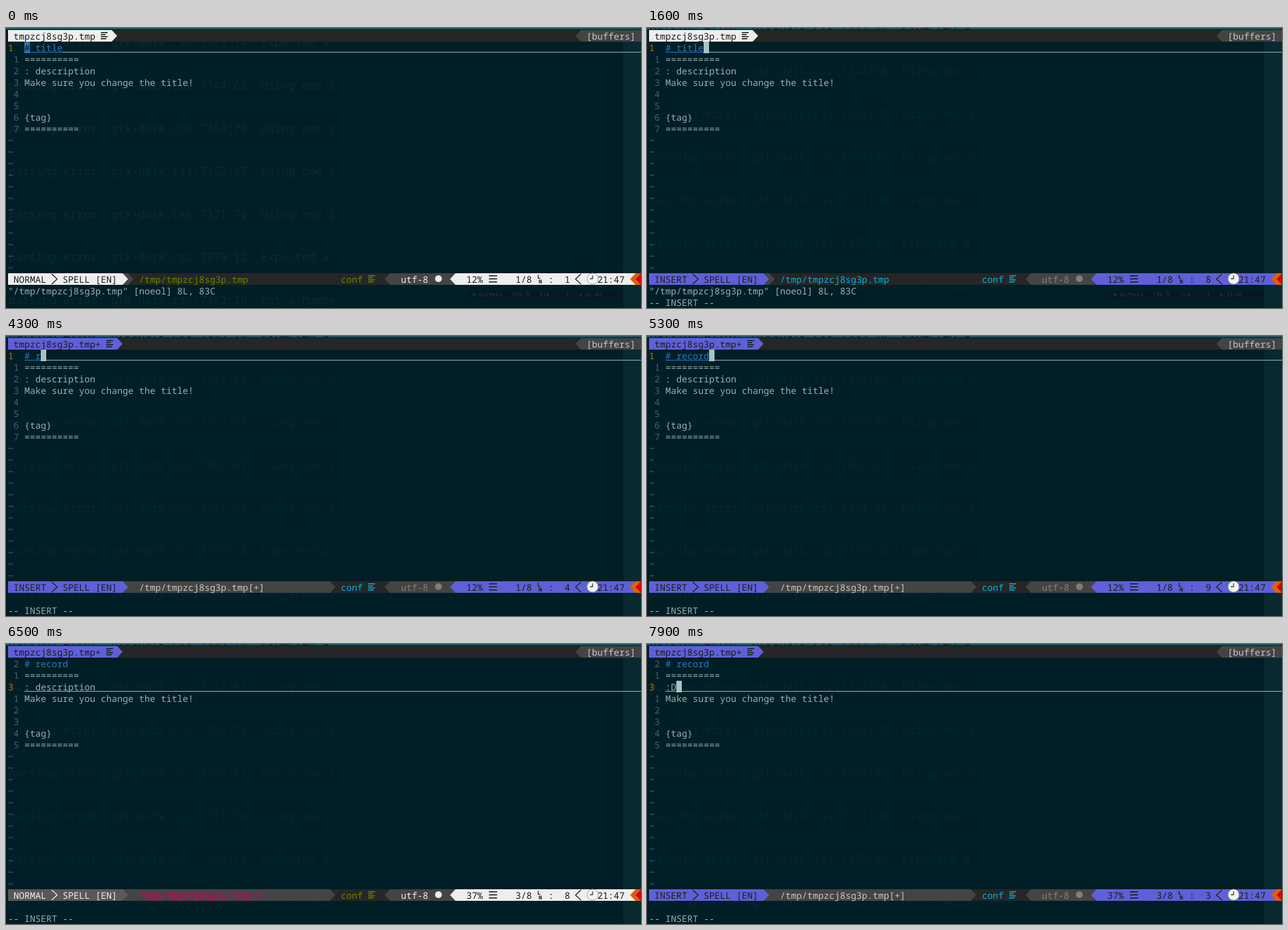
Write an HTML page that moves like this. It is 931 px wide and 411 px high and loops after 8 s.

```html
<!DOCTYPE html>
<html lang="en">
<head>
<meta charset="utf-8">
<title>Terminal editor</title>
<style>
  html, body { margin: 0; width: 100%; height: 100%; overflow: hidden; background: #001e26; }
  svg { display: block; width: 931px; height: 411px; }
  text {
    font: 13.333px "Noto Sans Mono", "DejaVu Sans Mono", monospace;
    white-space: pre;
    text-rendering: geometricPrecision;
  }
  .ghost { font-size: 16.667px; }
  .tiny { font-size: 8px; font-weight: bold; }
</style>
</head>
<body>
<svg id="stage" viewBox="0 0 931 411"></svg>
<script>
(() => {
const LOOP = 8000, CELL = 8, LINE = 17, LEFT = 27;
const C = {
  bg: '#001e26', text: '#93b1b1', blue: '#2379c2', tilde: '#1c74ae', num: '#49616a',
  current: '#a87808', cursor: '#a6c3c3', bar: '#262626', mid: '#444444', grey: '#585858',
  white: '#eeeeee', ink: '#1c1c1c', violet: '#5f5fd7', olive: '#5f8700', cyan: '#00afe0',
  pink: '#d7005f', light: '#c6c6c6', dim: '#808072'
};

// Each step changes only the listed parts of the editor state.
const steps = [
  [0, { row: 1, col: 1, insert: false, title: '# title', desc: ': description',
        dirty: false, msg: true, hint: false, cursor: true, shift: 21 }],
  [200, { shift: 0 }],
  [1000, { row: 2 }],
  [1400, { row: 1 }],
  [1600, { insert: true, hint: true, col: 8 }],
  [2000, { title: '# ', col: 3, dirty: true }],
  [2400, { title: '', col: 1, msg: false }],
  [2500, { title: '#', col: 2 }],
  [2800, { title: '# ', col: 3 }],
  [3600, { title: '# R', col: 4 }],
  [4100, { title: '# ', col: 3 }],
  [4300, { title: '# r', col: 4 }],
  [4500, { title: '# re', col: 5 }],
  [4700, { title: '# rec', col: 6 }],
  [4800, { title: '# reco', col: 7 }],
  [5000, { title: '# recor', col: 8 }],
  [5100, { title: '# record', col: 9 }],
  [5500, { insert: false, hint: false, col: 8 }],
  [5900, { row: 2 }],
  [6300, { row: 3 }],
  [6500, { hint: true, cursor: false }],
  [6600, { insert: true, cursor: true, col: 14 }],
  [6700, { desc: ':', col: 2 }],
  [7900, { desc: ':D', col: 3 }]
];

const rowTop = row => 3 + row * LINE;
const esc = s => s.replace(/&/g, '&amp;').replace(/</g, '&lt;');
const rect = (x, y, w, h, fill) => `<rect x="${x}" y="${y}" width="${w}" height="${h}" fill="${fill}"/>`;
const poly = (points, fill) => `<polygon points="${points}" fill="${fill}"/>`;
const write = (x, row, s, fill) => `<text x="${x}" y="${rowTop(row) + 14}" fill="${fill}">${esc(s)}</text>`;
const arrowRight = (x, y, fill) => poly(`${x},${y} ${x + 8},${y + 8.5} ${x},${y + 17}`, fill);
const arrowLeft = (x, y, fill) => poly(`${x + 8},${y} ${x},${y + 8.5} ${x + 8},${y + 17}`, fill);
const chevron = (x, y, dir, stroke) =>
  `<path d="M${x} ${y + 1}l${8 * dir} 7.5l${-8 * dir} 7.5" fill="none" stroke="${stroke}" stroke-width="1.2"/>`;
const lines = (x, y, widths, gap, fill) =>
  widths.map((w, i) => rect(x, y + i * gap, w, 1.5, fill)).join('');
const paraIcon = (x, y, fill) => lines(x, y, [10, 7, 10, 8], 3, fill);

function backdrop(s) {
  const notes = [
    '7335:14: Expected a', '7344:68: Using one c', '7353:70: Using one c', '7362:67: Using one c',
    '7371:70: Using one c', '7379:12: Expected a', '7382:16: not a numbe'
  ];
  const fill = s.shift ? '#0c2930' : '#08252c';
  let out = rect(0, 0, 931, 411, C.bg) + rect(905, 20, 26, 391, '#082930') + rect(0, 0, 931, 2, '#1d5365');
  notes.forEach((n, i) => {
    out += `<text class="ghost" x="4" y="${6 + i * 63 + s.shift}" fill="${fill}">parsing error: gtk-dark.css:${n}</text>`;
  });
  if (s.msg) {
    out += poly('676,391 681,386 905,386 905,397 681,397', '#06191f');
    out += '<text class="tiny" x="684" y="394" fill="#15323a">■ buffers   73% ☰   1/8  :  1   ● 21:47</text>';
  }
  return out;
}

function tabLine(s) {
  const fill = s.dirty ? C.violet : C.white;
  const end = s.dirty ? 163 : 155;
  return rect(3, 3, 928, 17, C.bar) + rect(3, 3, end - 3, 17, fill) + arrowRight(end, 3, fill) +
    write(11, 0, 'tmpzcj8sg3p.tmp' + (s.dirty ? '+' : ''), C.ink) + paraIcon(end - 16, 6, C.ink) +
    arrowLeft(835, 3, C.mid) + rect(843, 3, 88, 17, C.mid) + write(851, 0, '[buffers]', C.light);
}

function buffer(s) {
  const rows = [s.title, '==========', s.desc, 'Make sure you change the title!', '', '', '{tag}', '=========='];
  let out = '';
  rows.forEach((str, i) => {
    const row = i + 1, y = rowTop(row), here = row === s.row;
    const fill = row === 1 ? C.blue : C.text;
    out += here ? write(3, row, String(row), C.current)
                : write(11, row, String(Math.abs(row - s.row)), C.num);
    out += write(LEFT, row, str, fill);
    if (!here) return;
    const end = LEFT + str.length * CELL;
    out += rect(LEFT, y + 15, end - LEFT, 1, fill) + rect(end, y + 15, 931 - end, 1, C.text);
    if (!s.cursor) return;
    const x = LEFT + (s.col - 1) * CELL, under = str[s.col - 1];
    out += rect(x, y, CELL, LINE, under ? fill : C.cursor);
    if (under) out += write(x, row, under, C.bg);
  });
  for (let row = 9; row <= 20; row++) out += write(3, row, '~', C.tilde);
  return out;
}

function clock(x, y) {
  return `<circle cx="${x}" cy="${y}" r="8" fill="#f4f4f0" stroke="#a8a8a4"/>` +
    `<path d="M${x} ${y - 5}V${y}H${x - 4}" fill="none" stroke="#444" stroke-width="1.3"/>`;
}

function statusLine(s) {
  const y = 360, R = 21;
  const main = s.insert ? C.violet : C.white;
  const left = s.dirty && !s.insert ? C.grey : main;
  const leftInk = left === C.grey ? C.white : C.ink;
  const accent = s.insert ? C.cyan : C.olive;
  const encoding = s.insert ? C.dim : C.white;
  const fileInk = !s.dirty ? accent : s.insert ? C.light : C.pink;
  let out = rect(3, y, 928, 17, C.bar);

  if (s.dirty) out += rect(171, y, 304, 17, C.mid) + arrowRight(475, y, C.mid);
  else out += rect(171, y, 8, 17, C.mid) + arrowRight(179, y, C.mid);
  out += rect(3, y, 168, 17, left) + arrowRight(171, y, left);
  out += write(11, R, s.insert ? 'INSERT' : 'NORMAL', leftInk) + chevron(67, y, 1, leftInk);
  out += write(83, R, 'SPELL [EN]', leftInk);
  out += write(195, R, '/tmp/tmpzcj8sg3p.tmp' + (s.dirty ? '[+]' : ''), fileInk);
  out += write(491, R, 'conf', accent) + paraIcon(531, 363, accent);

  out += arrowLeft(555, y, C.mid) + rect(563, y, 96, 17, C.mid) + write(579, R, 'utf-8', encoding);
  out += `<circle cx="634" cy="368" r="5" fill="${encoding}"/>`;

  out += arrowLeft(651, y, main) + rect(659, y, 264, 17, main);
  out += write(675, R, Math.floor(s.row * 12.5) + '%', C.ink) + lines(708, 363, [12, 12, 12], 4.5, C.ink);
  out += write(747, R, s.row + '/8', C.ink);
  out += `<text class="tiny" x="779" y="368" fill="${C.ink}">L</text><text class="tiny" x="781" y="375" fill="${C.ink}">N</text>`;
  out += write(795, R, ':', C.ink) + write(811, R, String(s.col).padStart(2), C.ink);
  out += chevron(843, y, -1, C.ink) + clock(860, 368) + write(867, R, '21:47', C.ink);
  out += arrowLeft(915, y, '#e06000') + rect(923, y, 8, 17, '#e06000') + arrowLeft(923, y, '#d70000');
  return out;
}

function commandLine(s) {
  return (s.msg ? write(3, 22, '"/tmp/tmpzcj8sg3p.tmp" [noeol] 8L, 83C', C.text) : '') +
    (s.hint ? write(3, 23, '-- INSERT --', C.text) : '');
}

const stage = document.getElementById('stage');
const start = performance.now();
let shown = -1;

function draw(now) {
  const t = Math.max(0, now - start) % LOOP;
  const count = steps.filter(([at]) => at <= t).length;
  if (count !== shown) {
    shown = count;
    const s = Object.assign({}, ...steps.slice(0, count).map(([, change]) => change));
    stage.innerHTML = backdrop(s) + tabLine(s) + buffer(s) + statusLine(s) + commandLine(s);
  }
  requestAnimationFrame(draw);
}
draw(start);
})();
</script>
</body>
</html>
```
